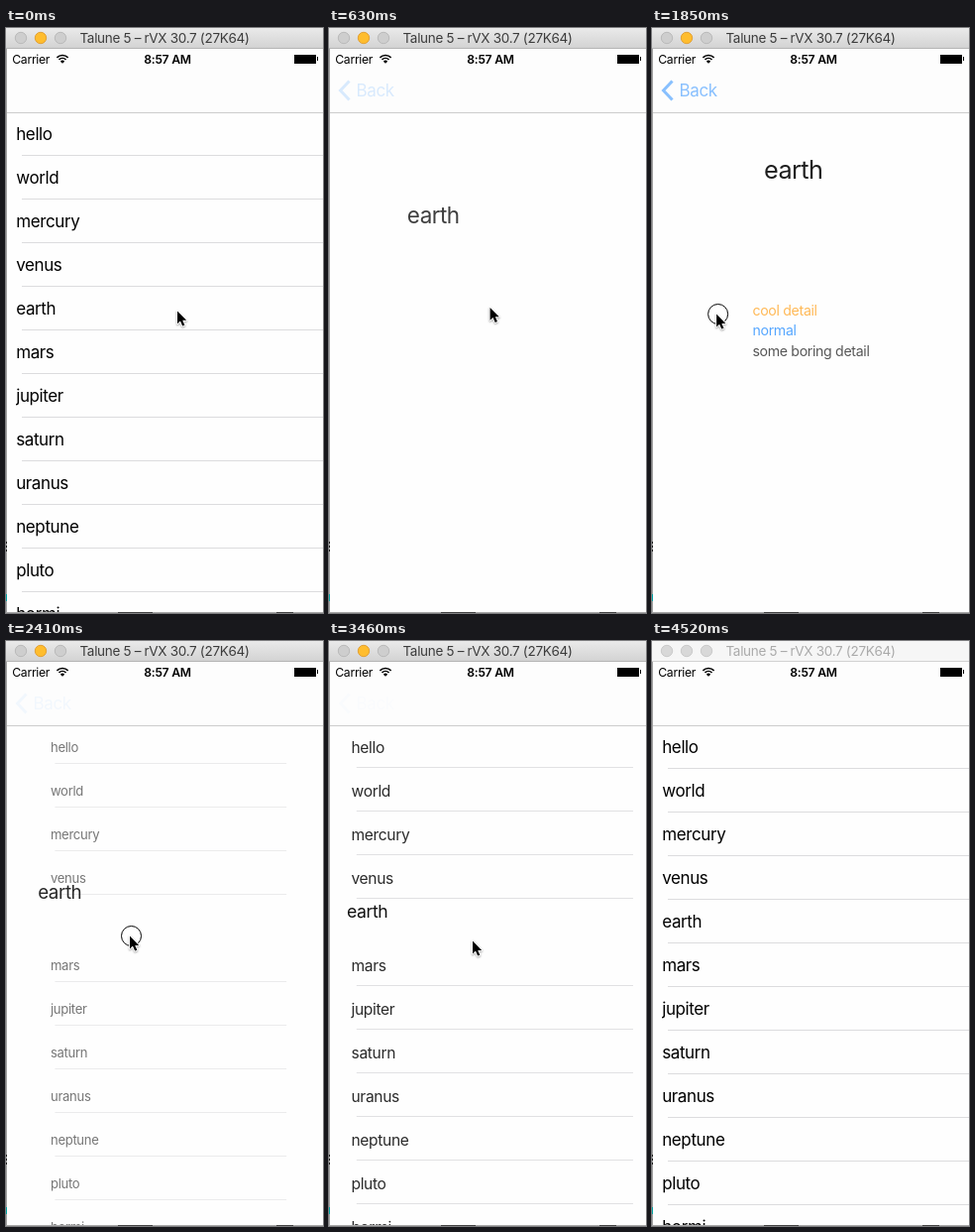
Animation, 320 px wide and 590 px high, one loop 4620 ms. Source, as an HTML page with a canvas:

```html
<!DOCTYPE html>
<html lang="en">
<head>
<meta charset="utf-8">
<title>List transition</title>
<style>
  html, body { margin: 0; width: 100%; height: 100%; overflow: hidden; background: #fff; }
  canvas { display: block; width: 320px; height: 590px; }
</style>
</head>
<body>
<canvas id="stage" width="320" height="590"></canvas>
<script>
const ctx = document.getElementById('stage').getContext('2d');
const LOOP = 4620;
const CENTER = 160.5;
const ROWS = ['hello', 'world', 'mercury', 'venus', 'earth', 'mars', 'jupiter',
  'saturn', 'uranus', 'neptune', 'pluto', 'hormi'];
const HERO = 4;
const DETAILS = [['cool detail', '#ff9500', 285], ['normal', '#007aff', 305.5],
  ['some boring detail', '#000', 326]];

// [time, list-to-detail progress] while the edge is being dragged
const DRAG = [[1600, 1], [1740, .96], [1850, .867], [2130, .42], [2410, .185],
  [2715, .185], [2880, .13], [3125, .13], [3290, .066], [3460, .066], [3580, 0]];
// [time, x, y] of the pointer tip
const POINTER = [[0, 173, 285], [410, 172, 281], [600, 172, 281], [1150, 5, 288],
  [1580, 5, 288], [1850, 65, 288], [2130, 102, 292], [2410, 125, 297], [2715, 125, 297],
  [2880, 132, 299], [3125, 132, 299], [3290, 140, 301], [3400, 140, 301],
  [3460, 145, 302], [3880, 145, 302], [3990, 173, 360]];

const clamp = v => Math.max(0, Math.min(1, v));
const mix = (a, b, k) => a + (b - a) * k;

function track(keys, t, column) {
  const next = keys.findIndex(key => key[0] > t);
  if (next < 0) return keys[keys.length - 1][column];
  if (next === 0) return keys[0][column];
  const a = keys[next - 1], b = keys[next];
  return mix(a[column], b[column], (t - a[0]) / (b[0] - a[0]));
}

function progress(t) {
  if (t >= 1600) return track(DRAG, t, 1);
  const k = clamp((t - 90) / 980);
  return k * k * (3 - 2 * k);
}

function text(string, x, y, size, color = '#000', weight = 400, align = 'left') {
  ctx.font = `${weight} ${size}px Inter, sans-serif`;
  ctx.letterSpacing = `${-.023 * size}px`;
  ctx.textAlign = align;
  ctx.fillStyle = color;
  ctx.fillText(string, x, y);
}

function rect(x, y, w, h, color) {
  ctx.fillStyle = color;
  ctx.fillRect(x, y, w, h);
}

function disc(x, y, r, fill, stroke) {
  ctx.beginPath();
  ctx.arc(x, y, r, 0, 7);
  if (fill) { ctx.fillStyle = fill; ctx.fill(); }
  if (stroke) { ctx.lineWidth = 1; ctx.strokeStyle = stroke; ctx.stroke(); }
}

// Draws a part shrunk to half size and faded as `gone` goes from 0 to 1.
function vanishing(y, gone, draw) {
  if (gone >= 1) return;
  ctx.save();
  ctx.translate(CENTER, y);
  ctx.scale(1 - gone / 2, 1 - gone / 2);
  ctx.globalAlpha = 1 - gone;
  draw();
  ctx.restore();
}

function drawList(p) {
  const gone = clamp(p / .4);
  ROWS.forEach((name, i) => {
    if (i === HERO && p > 0) return;
    const y = 107 + 44 * i;
    vanishing(y, gone, () => text(name, 10.2 - CENTER, 6, 17));
    if (gone > .5) return;
    const scale = 1 - gone / 2;
    ctx.globalAlpha = 1 - gone;
    rect(CENTER - 144.5 * scale, Math.round(y + 21.3 * scale), 304 * scale, 1, '#dcdcde');
    ctx.globalAlpha = 1;
  });
}

function drawDetail(p) {
  const gone = clamp((1 - p) / .4);
  for (const [label, color, y] of DETAILS)
    vanishing(y, gone, () => text(label, 89.5 - CENTER, 6, 17, color));
  if (p > 0) {
    ctx.globalAlpha = 1 - p * (1 - p);
    text('earth', mix(10.2, 129, p), mix(289, 130.5, p), mix(17, 26.5, p));
    ctx.globalAlpha = 1;
  }
}

function drawNavigation(p) {
  rect(1, 21, 319, 64, '#fdfdfd');
  rect(1, 85, 319, 1, '#cdcdcd');
  ctx.globalAlpha = Math.max((p - .75) * 4, p * .25);
  ctx.strokeStyle = '#007aff';
  ctx.lineWidth = 3;
  ctx.beginPath();
  ctx.moveTo(20.5, 53.5);
  ctx.lineTo(11.5, 63);
  ctx.lineTo(20.5, 72.5);
  ctx.stroke();
  text('Back', 27.5, 69, 17, '#007aff');
  ctx.globalAlpha = 1;
}

function drawStatus() {
  text('Carrier', 6.2, 35.5, 12.2);
  text('8:57 AM', 163, 35.5, 12.2, '#000', 600, 'center');
  ctx.strokeStyle = '#000';
  ctx.lineWidth = 1.6;
  for (const r of [5, 8]) {
    ctx.beginPath();
    ctx.arc(57, 35.5, r, -2.35, -.79);
    ctx.stroke();
  }
  ctx.beginPath();
  ctx.moveTo(57, 35.8);
  ctx.arc(57, 35.8, 3, -2.35, -.79);
  ctx.fillStyle = '#000';
  ctx.fill();
  rect(291, 27, 22, 9, '#000');
  rect(314, 29, 1, 4, '#000');
}

function drawWindow(active) {
  const bar = ctx.createLinearGradient(0, 0, 0, 20);
  bar.addColorStop(0, active ? '#eaeaea' : '#f6f6f6');
  bar.addColorStop(1, active ? '#d3d3d3' : '#f6f6f6');
  rect(0, 0, 320, 20, bar);
  rect(0, 20, 320, 1, active ? '#b4b4b4' : '#d2d2d2');
  [15, 35, 55].forEach((x, i) => {
    const lit = active && i === 1;
    disc(x, 10, 5.7, lit ? '#ffbd2e' : active ? '#cecece' : '#d8d8d8',
      lit ? '#e2a136' : active ? '#bababa' : '#cacaca');
  });
  text('Talune 5 – rVX 30.7 (27K64)', 160, 15, 13.5, active ? '#3c3c3c' : '#aaa', 400, 'center');

  rect(0, 21, 1, 569, '#a2a2a2');
  for (const y of [518, 522, 526]) rect(0, y, 1, 2, '#222');
  rect(0, 571, 1, 7, '#00a5a5');
  rect(0, 589, 320, 1, '#a8a8a8');
  rect(113, 589, 35, 1, '#444');
  rect(273, 589, 17, 1, '#444');
}

function drawPointer(t) {
  const x = track(POINTER, t, 1), y = track(POINTER, t, 2);
  if (t >= 1330 && t < 3460) disc(x + 1.5, y + .5, 10, null, '#000');
  ctx.save();
  ctx.translate(x, y + .5);
  ctx.scale(.92, .92);
  const arrow = new Path2D('M0 0V14L3.2 11L5.6 16.4L8 15.4L5.7 10.2H10Z');
  ctx.strokeStyle = '#fff';
  ctx.lineWidth = 2;
  ctx.lineJoin = 'round';
  ctx.shadowColor = 'rgba(0,0,0,.35)';
  ctx.shadowBlur = 2;
  ctx.shadowOffsetY = 1;
  ctx.stroke(arrow);
  ctx.shadowColor = 'transparent';
  ctx.fillStyle = '#000';
  ctx.fill(arrow);
  ctx.restore();
}

function draw(t) {
  const p = progress(t);
  const active = t < 4520;
  rect(0, 0, 320, 590, '#fefefe');
  drawList(p);
  drawNavigation(p);
  drawDetail(p);
  drawStatus();
  drawWindow(active);
  if (active) drawPointer(t);
}

const start = performance.now();
function tick() {
  draw((performance.now() - start) % LOOP);
  requestAnimationFrame(tick);
}
tick();
</script>
</body>
</html>
```
